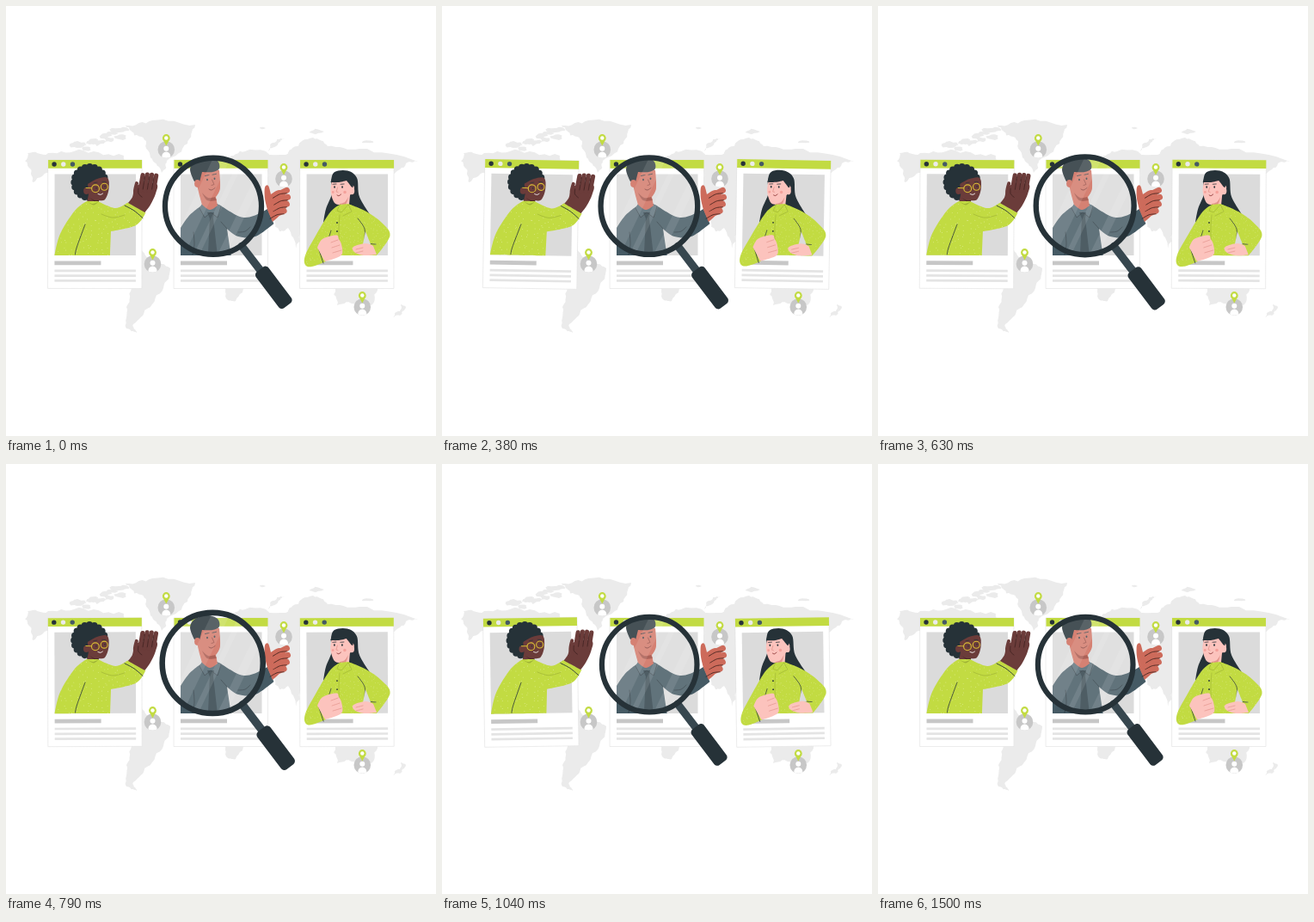
An HTML page with a canvas for the animation above (1.54 s loop, 500 px wide and 500 px high).

```html
<!DOCTYPE html>
<html lang="en">
<head>
<meta charset="utf-8">
<title>Profile search</title>
<style>
html, body { margin: 0; width: 100%; height: 100%; overflow: hidden; background: #fff; }
canvas { display: block; width: 500px; height: 500px; }
</style>
</head>
<body>
<canvas id="stage"></canvas>
<script>
const canvas = document.getElementById('stage');
const ctx = canvas.getContext('2d');
const ratio = window.devicePixelRatio || 1;
canvas.width = canvas.height = 500 * ratio;

const LIME = '#c2db42', OLIVE = '#9fb436', DARK = '#263238', SLATE = '#455a64', LAND = '#ebebeb';
const BROWN = '#6b3c3a', TAN = '#cd6b5b', PINK = '#fcc3bd', ROSE = '#e2938b';

// ---------- helpers ----------
let seed = 11;
const random = () => (seed = (seed * 16807) % 2147483647) / 2147483647;
const between = (a, b) => a + random() * (b - a);

// Smooth curve through key points; a point marked * is a corner.
function curve(keys, closed) {
  const points = keys.split(' ').map(key => {
    const [x, y] = key.split(',').map(parseFloat);
    return { x, y, sharp: key.endsWith('*') };
  });
  const n = points.length, path = new Path2D();
  const at = i => points[(i + n) % n];
  const slope = i => {
    const still = at(i).sharp || (!closed && (i === 0 || i === n - 1));
    return still ? [0, 0] : [(at(i + 1).x - at(i - 1).x) / 6, (at(i + 1).y - at(i - 1).y) / 6];
  };
  path.moveTo(points[0].x, points[0].y);
  for (let i = 0; i < (closed ? n : n - 1); i++) {
    const a = at(i), b = at(i + 1), [ax, ay] = slope(i), [bx, by] = slope(closed ? (i + 1) % n : i + 1);
    path.bezierCurveTo(a.x + ax, a.y + ay, b.x - bx, b.y - by, b.x, b.y);
  }
  return path;
}
const blob = keys => curve(keys, true);

function circle(x, y, r, ry = r) {
  const path = new Path2D();
  path.ellipse(x, y, r, ry, 0, 0, Math.PI * 2);
  return path;
}
function fill(shape, color) {
  ctx.fillStyle = color;
  ctx.fill(typeof shape === 'string' ? blob(shape) : shape);
}
function line(shape, color = DARK, width = 0.8) {
  ctx.strokeStyle = color;
  ctx.lineWidth = width;
  ctx.lineCap = ctx.lineJoin = 'round';
  ctx.stroke(typeof shape === 'string' ? curve(shape, false) : shape);
}
const oval = (x, y, r, color, ry) => fill(circle(x, y, r, ry), color);
function rect(x, y, w, h, color) {
  ctx.fillStyle = color;
  ctx.fillRect(x, y, w, h);
}
function clipped(shape, draw) {
  ctx.save();
  ctx.clip(shape);
  draw();
  ctx.restore();
}
function around(x, y, change, draw) {
  ctx.save();
  ctx.translate(x, y);
  change();
  ctx.translate(-x, -y);
  draw();
  ctx.restore();
}
function speckles(x0, y0, x1, y1, step) {
  const path = new Path2D();
  for (let y = y0; y < y1; y += step) {
    for (let x = x0; x < x1; x += step) {
      path.addPath(circle(x + random() * step, y + random() * step, 0.45));
    }
  }
  return path;
}

// ---------- map ----------
// Coastline: a coarse outline roughened by midpoint displacement.
function coast(outline) {
  let points = outline.split(' ').map(p => p.split(',').map(Number));
  for (let pass = 0; pass < 3; pass++) {
    points = points.flatMap(([x, y], i) => {
      const [u, v] = points[(i + 1) % points.length];
      const bend = between(-0.2, 0.2) * Math.min(1, 12 / Math.hypot(u - x, v - y));
      return [[x, y], [(x + u) / 2 + (v - y) * bend, (y + v) / 2 - (u - x) * bend]];
    });
  }
  return new Path2D('M' + points.join('L') + 'Z');
}
function island(x, y, rx, ry) {
  const path = new Path2D();
  for (let i = 0; i < 11; i++) {
    const a = i * Math.PI / 5.5, k = between(0.65, 1.25);
    path.lineTo(x + rx * k * Math.cos(a), y + ry * k * Math.sin(a));
  }
  return path;
}
const lands = [
  '22,180 25,171 49,171 90,168 137,174 140,190 47,194 31,205 28,189',
  '139,139 170,133 220,138 211,160 187,180 181,194 170,178 163,157 146,146',
  '155,282 170,296 191,305 183,328 164,352 148,370 152,380 140,375 140,350 146,325 140,300',
  '252,322 258,342 267,343 280,322',
  '257,178 278,169 325,173 333,165 357,153 374,163 411,166 479,181 465,183 450,196 345,245 337,282 328,258 318,262 303,240 303,190',
  '302,171 308,160 324,154 314,163',
  '382,322 385,348 407,345 425,348 434,324',
  '449,363 458,355 459,347 465,350 458,360'
].map(coast);
for (let i = 0; i < 14; i++) {
  const x = 80 + i * 4.4;
  lands.push(island(x, 166 - i * 1.6 + between(-6, 6), between(4, 8), between(2, 3.6)));
}
lands.push(island(298, 142, 4, 1), island(361, 146, 8, 3), island(420, 158, 8, 1.5));

function pin(x, y) {
  const disc = circle(x, y, 9.8);
  fill(disc, '#c7c7c7');
  clipped(disc, () => {
    oval(x, y - 1.2, 3, '#fff');
    oval(x, y + 7.7, 5, '#fff', 5.2);
  });
  around(x, y, () => {}, () => {
    oval(x, y - 13.5, 4.4, LIME);
    fill(new Path2D(`M${x - 4.2} ${y - 12.2}L${x} ${y - 4.5}L${x + 4.2} ${y - 12.2}Z`), LIME);
    oval(x, y - 13.5, 2.2, '#fff');
  });
}
function drawMap() {
  lands.forEach(land => fill(land, LAND));
  pin(186.3, 167);
  pin(170.5, 300);
  pin(323, 201);
  pin(414.3, 350);
}

// ---------- cards ----------
function card(x) {
  rect(x, 179, 109, 149.5, '#fff');
  ctx.strokeStyle = '#e4e4e4';
  ctx.lineWidth = 0.7;
  ctx.strokeRect(x, 179, 109, 149.5);
  rect(x, 179, 109, 9.8, LIME);
  [DARK, LAND, SLATE].forEach((c, i) => oval(x + 7 + i * 10.7, 184, 2.7, c));
  rect(x + 7.5, 195.5, 94.5, 94.5, '#dbdbdb');
  rect(x + 7.5, 296.5, 54, 4.8, '#c7c7c7');
  for (let i = 0; i < 3; i++) rect(x + 7.5, 306.5 + i * 5.8, 94.5, 2.7, '#e4e4e4');
}

// ---------- waving woman ----------
const sweater = blob('94,227* 80,238 63,265 56.5,290* 121,290* 122,262* 151,255 162.5,240* 141.5,228.5* 127,235 107,227*');
const sweaterDots = speckles(56, 226, 163, 290, 6);

function wavingWoman() {
  for (let i = 0; i < 20; i++) {
    const a = i * Math.PI / 10;
    oval(97.3 + 18.2 * Math.cos(a), 205 + 18.2 * Math.sin(a), 3.8, DARK);
  }
  oval(97.3, 205, 19.5, DARK);
  fill('95,207* 106,201 118,200 119.5,213 115,225 107,226* 107,231 94,229* 96,219*', BROWN);
  oval(93.5, 215, 3.4, BROWN, 4);
  fill('97,223* 103,226 108,226* 106,229', '#482625');
  fill(sweater, LIME);
  clipped(sweater, () => fill(sweaterDots, '#e9f1ae'));
  fill('94,227* 101,230 108,227* 102,231.5', OLIVE);
  line('80.5,289 82.5,280 92,254');
  line('111,242 124,246 138,243', OLIVE, 0.7);
  line('138,232 149,238 159,246.5', DARK, 0.9);

  fill('142,229* 147,222 150,211 158,207 175,207 174,218 168,231 161.5,240*', BROWN);
  for (let i = 0; i < 4; i++) {
    const x = 157 + i * 5.2, tip = 196 + (i - 1.3) ** 2 * 0.4;
    line(`${x - 1},214 ${x + 2},${tip}`, BROWN, 5.2);
    if (i) line(`${x - 3},213 ${x - 0.8},${tip + 2}`, '#3a1f1e', 0.7);
  }
  line('151,223 150,215 152,206', BROWN, 4);
  line('154,212 154,218 158,222', '#3a1f1e', 0.7);

  line(circle(104, 212.3, 4.4), '#d8bd35', 1.1);
  line(circle(114.3, 210.2, 4), '#d8bd35', 1.1);
  line('93,211.5 99.5,211.8', '#d8bd35', 1);
  oval(105, 211.8, 0.8, DARK);
  oval(115, 209.8, 0.8, DARK);
  line('102,205.8 106,205', DARK, 0.7);
  line('112,204.3 116,204.5', DARK, 0.7);
  line('107,218.5 110,219.3 112.5,218', '#fff', 0.9);
}

// ---------- standing woman ----------
const blouse = blob('388,231* 376,241 359,269 348,290 348,301 356,303 372,297* 368,283* 374,275* 372,290* 431,290* 446.5,267 437,252 419,239 398,230*');
const blouseDots = speckles(346, 230, 447, 304, 4.3);

function standingWoman() {
  fill('378,204 382,193 397,191.5 408,200 411,222 424.5,244* 404,237* 390,230* 382,244 369,252* 372,236 379,218', DARK);
  fill('379,203* 377.5,216 382,229 389,231* 391,239 399,231* 400,220* 405,211 398,203*', PINK);
  fill('388,230* 394,228 398,222* 395,231 388,233*', ROSE);
  fill('377.5,205* 383,194 396,193 404,202 403,212* 396,203* 387,205', DARK);
  oval(402, 215, 3.2, PINK, 4.2);

  fill(blouse, LIME);
  clipped(blouse, () => fill(blouseDots, '#dbe78c'));
  line('388,231* 385,238* 390,240* 398,231* 402,239* 392,244', OLIVE, 0.7);
  line('388,243 387,260 388,290', OLIVE, 0.6);
  oval(385, 252, 0.9, DARK);
  oval(385, 262, 0.9, DARK);
  line('374,274 378,261', DARK, 0.7);
  line('409,247 417,259 418,274 430,277', DARK, 0.7);
  line('363.5,282 369,299');
  fill('418,262* 424,277* 415,277*', '#dbdbdb');

  fill('362,281* 368,271 384,266.5 387,271 390,277 391,288 384,293 371,297*', PINK);
  for (let i = 0; i < 3; i++) line(`${386 + i * 2},${272 + i * 6} ${378 + i},${275 + i * 6}`, ROSE, 0.7);
  fill('427,279* 418,276 404,280 405,286 416,290 431,289*', PINK);
  for (let i = 0; i < 2; i++) line(`407,${283 + i * 4} 415,${281 + i * 4}`, ROSE, 0.7);

  for (const x of [382, 391]) {
    oval(x, 210.5, 0.9, DARK, 1.2);
    line(`${x - 2},207.3 ${x + 2},207`, DARK, 0.8);
  }
  line('385.5,211 384,216* 386,216.5', ROSE, 0.8);
  line('385,220 387,220.7 389.5,219', '#8b3434', 0.9);
  oval(394, 216.5, 1.8, '#f4a19b');
  oval(380.2, 216.5, 1.4, '#f4a19b');
}

// ---------- man ----------
const photo = new Path2D('M203 150H320V290H203Z');

function man() {
  clipped(photo, () => {
    fill('229,231* 212,245 198,269 198,292* 262,292* 257,259* 270,268 290,268 311.5,253* 304,236* 288,244 272,245 248,231*', SLATE);
    fill('228,230* 225,235* 231,246* 238,240* 246,246* 250,233* 246,230*', '#50656f');
    fill('234,240* 242,240* 241,247* 246,290* 235,290* 237,247*', '#2f4049');
    line('225,235* 231,246* 238,240* 246,246* 250,233*', DARK, 0.7);
    line('218,263 219,277 217,289', DARK, 0.7);
    line('257,259 250,251', DARK, 0.7);
    line('284,257 278,262 270,263', DARK, 0.7);
  });
  fill('221,194* 223,212 228,231* 237,237 246,232* 244,222* 249,212 248,191* 235,188', TAN);
  fill('228,217* 235,223 243,222* 245,226* 234,226', '#9c473b');
  fill('219,204* 214,190 220,180 234,176 246,180 248,189 240,193 228,193* 225,205*', DARK);
  oval(222.5, 206.5, 3.4, TAN, 4.4);
  for (const x of [234, 242.5]) {
    const y = 202 - (x - 234) * 0.15;
    oval(x, y, 0.9, DARK, 1.3);
    line(`${x - 2.5},${y - 4.5} ${x + 2},${y - 5.5}`, DARK, 0.9);
  }
  line('239.5,202 242,207.5* 239,208.5', '#7d3028', 0.8);
  line('236,213 239,214 243,211.5', '#7d3028', 1);

  fill('304,237* 301,224 301,211 305,209 308,219* 318,214 326,222 325,236 310,251*', TAN);
  for (let i = 0; i < 4; i++) {
    const y = 214.3 + i * 8, x = 327.5 - (i - 1) ** 2 * 1.1;
    line(`312,${y + 7 - i} ${x},${y}`, TAN, 7);
    line(`${x},${y + 3.5} ${x - 8},${y + 4.5} ${x - 16},${y + 9}`, '#3e201c', 0.85);
  }
}

// ---------- magnifier ----------
const glass = circle(241.2, 233.2, 54);

function magnifier() {
  line('274,279 297,309', '#37474f', 9);
  around(295.5, 306.5, () => ctx.rotate(Math.atan2(41, 31)), () => {
    ctx.beginPath();
    ctx.roundRect(294.5, 297.5, 52, 18, 4.5);
    ctx.fillStyle = DARK;
    ctx.fill();
  });
  fill(glass, 'rgba(255,255,255,.15)');
  clipped(glass, () => {
    ctx.globalAlpha = 0.1;
    line('253,174 196,293', '#fff', 18);
    line('277,174 220,293', '#fff', 6);
    line('299,190 249,293', '#fff', 9);
  });
  line(circle(241.2, 233.2, 55.3), DARK, 6.2);
}

// ---------- motion ----------
const LOOP = 1540, CYCLE = 1500, STEP = 1000 / 24, LEAD = 20;

// Linear interpolation through [position, value] stops.
function track(stops, p) {
  const i = Math.max(1, stops.findIndex(s => s[0] >= p));
  const [a, u] = stops[i - 1], [b, v] = stops[i];
  return u + (v - u) * (p - a) / (b - a);
}
const beat = [[0, 1], [0.1, 1.1], [0.3, 1], [0.4, 1], [0.5, 1.1], [0.6, 1], [1, 1]];
const sway = [[0, 0], [0.25, 1], [0.75, -1], [1, 0]];

function draw(now) {
  const step = Math.min(36, Math.floor((now % LOOP + 4) / STEP));
  const p = Math.min(1, (step * STEP + LEAD) / CYCLE);
  const scale = track(beat, p), angle = track(sway, p) * Math.PI / 180;
  const turn = () => ctx.rotate(angle);

  ctx.setTransform(ratio, 0, 0, ratio, 0, 0);
  rect(0, 0, 500, 500, '#fff');
  drawMap();
  around(103.5, 254, turn, () => { card(49); wavingWoman(); });
  around(396.5, 254, turn, () => { card(342); standingWoman(); });
  card(195.5);
  man();
  around(258, 263, () => ctx.scale(scale, scale), magnifier);
}

let start;
function tick(now) {
  start ??= now;
  draw(now - start);
  requestAnimationFrame(tick);
}
draw(0);
requestAnimationFrame(tick);
</script>
</body>
</html>
```
